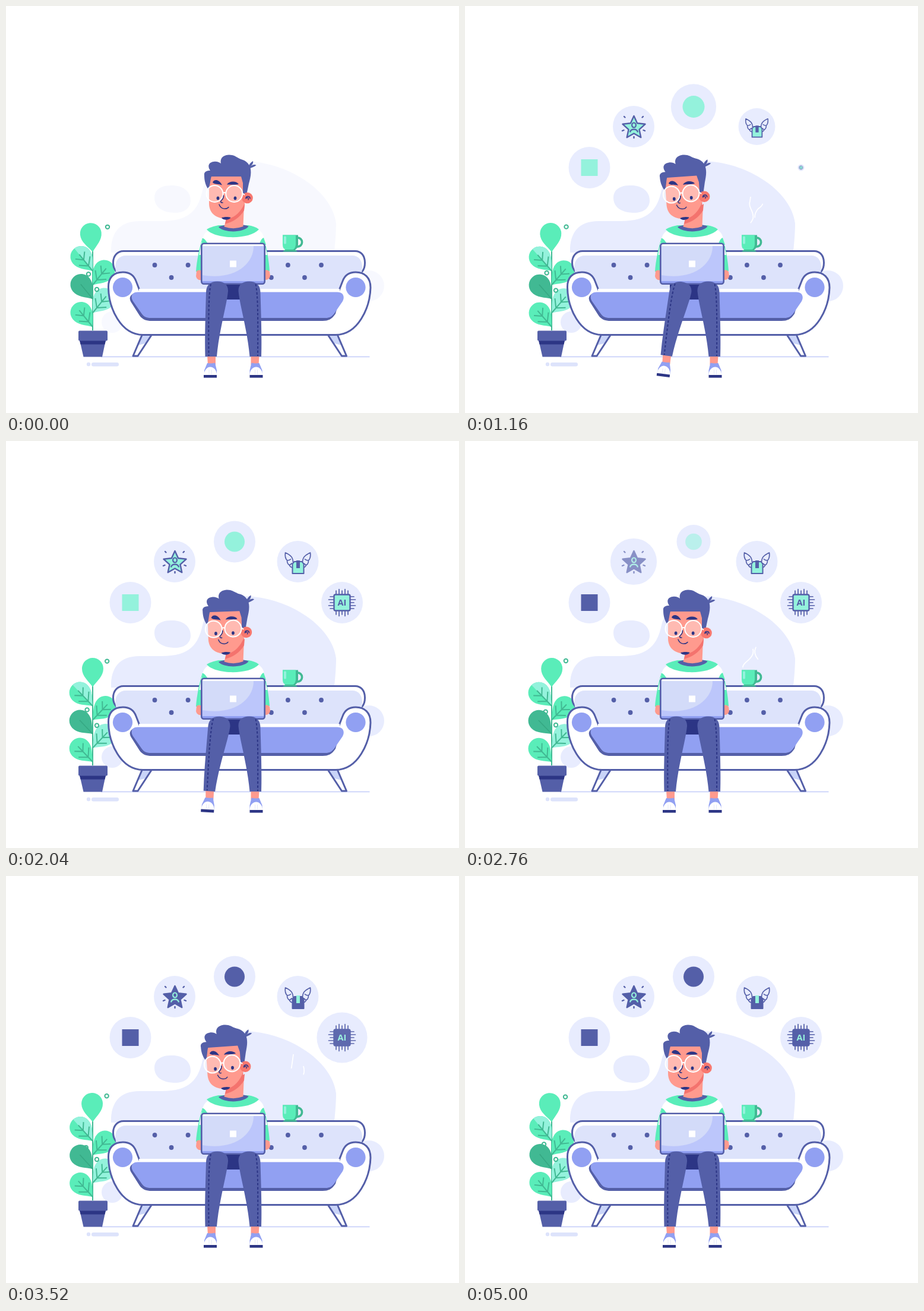
Write an HTML page that moves like this. It is 763 px wide and 685 px high and loops after 5.04 s.

```html
<!DOCTYPE html>
<html lang="en">
<head>
<meta charset="utf-8">
<title>Working from the sofa</title>
<style>
html, body { margin: 0; width: 100%; height: 100%; overflow: hidden; background: #fff; }
svg { display: block; width: 100vw; height: 100vh; }
.ink { fill: #545fa8; }
.line { fill: none; stroke: #545fa8; stroke-width: 3; stroke-linecap: round; stroke-linejoin: round; }
.navy { fill: #2c3585; }
.peri { fill: #91a0f2; }
.pale { fill: #dde3fb; }
.skin { fill: #ff9a8e; }
.green { fill: #5aedb9; }
.deep { fill: #41b993; }
.mint { fill: #94f2dc; }
.white { fill: #fff; }
.vein { fill: none; stroke: #41b993; stroke-width: 2; }
.steam { fill: none; stroke: #fff; stroke-width: 1.7; }
.thin { fill: none; stroke: #2c3585; stroke-width: 1.5; stroke-linecap: round; }
.out { stroke: #545fa8; stroke-width: 2.4; stroke-linejoin: round; stroke-linecap: round; }
.fine { fill: none; stroke: #545fa8; stroke-width: 1.7; stroke-linejoin: round; stroke-linecap: round; }
.ai { font: 700 14.5px "Open Sans", sans-serif; text-anchor: middle; }
</style>
</head>
<body>
<svg viewBox="0 0 763 685" preserveAspectRatio="none">
  <defs>
    <path id="leaf" d="M0 0C-7-10-18-18-18-31A18 18 0 0 1 18-31C18-18 7-10 0 0Z"/>
    <path id="half" d="M0 0V-49A18 18 0 0 1 18-31C18-18 7-10 0 0Z"/>
    <path id="veins" class="vein" d="M0 0V-36M-12-22L0-11L12-22M-10-34L0-24L10-34"/>
    <g id="sofaLeg">
      <path d="M229 554L214 589H222L245 554Z" fill="#fff"/>
      <path d="M228 555H244L234 568L222 571Z" fill="#c9d4f8"/>
      <path class="line" d="M229 554L214 589H222L245 554"/>
    </g>
    <g id="leg">
      <path class="skin" d="M339 588H353V604H340Z"/>
      <path class="peri" d="M339 601Q346 602 352 600.5L355 613V621H334V613Z"/>
      <path class="white" d="M333.5 621C334 612 339 607.5 344 607.5C350 607.5 355 613 355 621Z"/>
      <path d="M342 612V620M346 612V620" stroke="#e4e8fa" fill="none"/>
      <rect class="navy" x="333" y="621" width="22" height="4.6"/>
      <path class="ink" d="M337 482C337 469 345 463.5 356 463.5C367 463.5 374.5 469 374 480C372 503 359 545 355 590H335.5C334.5 555 336 520 337 482Z"/>
      <path d="M345 468C341 485 341 530 341.5 589" fill="none" stroke="#2c3585" stroke-width="2" stroke-dasharray="4 3"/>
    </g>
    <path id="wing" class="fine" d="M-8 1C-8-7-12-11-21-15C-22-8-20-4-18-2C-18 3-16 5-14 6C-13 9-11 10-8 10M-18-2Q-14-2-12-4M-14 6L-10 3"/>
  </defs>

  <g id="backdrop" fill="#e8ecfe">
    <path d="M177 415C176 383 190 362 225 362H262C310 362 324 342 331 310C339 276 375 257 417 262C485 269 550 315 556 366C556 385 554 400 553 415Z"/>
    <path d="M250 323C250 308 263 301 280 302C298 302 311 312 311 327C311 342 298 349 282 348C264 347 250 339 250 323Z"/>
    <circle cx="611" cy="471" r="26"/><circle cx="179" cy="532" r="18"/>
  </g>

  <path d="M160 590.3H612.5" stroke="#c9d2fa" stroke-width="1.7"/>
  <circle class="pale" cx="139" cy="603" r="3.2"/>
  <rect class="pale" x="144" y="600" width="46" height="6.4" rx="3.2"/>

  <path class="vein" d="M146 411V546"/>
  <g id="plant"></g>
  <path class="ink" d="M124 562H168L162 590.5H130.5Z"/>
  <path class="navy" d="M124 563H168L166.5 569.5H125.5Z"/>
  <rect class="ink" x="122" y="546.5" width="49" height="17" rx="2"/>

  <use href="#sofaLeg"/><use href="#sofaLeg" transform="matrix(-1 0 0 1 787.5 0)"/>
  <path class="line" style="fill:#fff" d="M198 412.5H588C598 412.5 604.5 420 604.5 432C604.5 445 598 452 588 452H198C188 452 180.5 444 180.5 432C180.5 420 188 412.5 198 412.5Z"/>
  <path class="pale" d="M202 420H583C594 420 600 428 600 440L596 478H190L184 440C184 428 191 420 202 420Z"/>
  <g id="buttons" class="ink"></g>
  <path class="line" style="fill:#fff" d="M226 481L219 463C215 452 207 448 197 448C181 448 172 457 172.5 474C173 508 193 553.5 231 553.5H555C593 553.5 613 508 614 474C614 457 604 448 589 448C579 448 571 452 567 463L560 481"/>
  <path class="white" d="M224 476H562V486H224Z"/>
  <path class="ink" d="M222 482C209 484 206 491 211 499L225 521C230 528 237 530 245 530H533C543 530 549 527 555 518L560 500Z"/>
  <path class="peri" d="M222 481.5H558C568 481.5 571 489 567 497L554 516C549 523 545 525 538 525H244C236 525 232 523 228 517L214 497C209 489 212 481.5 222 481.5Z"/>
  <circle class="peri" cx="196.5" cy="473.5" r="16.6"/><circle class="peri" cx="589" cy="473.5" r="16.6"/>

  <g id="steam"></g>
  <circle cx="491" cy="397.5" r="7.6" fill="none" stroke="#41b993" stroke-width="3.6"/>
  <path class="deep" d="M466 385.5H492V402Q491 411 482 411H474Z"/>
  <path class="green" d="M466 385.5H488V402Q487 411 479 411H474Q466 410 466 402Z"/>
  <rect class="mint" x="468" y="387.5" width="4" height="13" rx="1.5"/>
  <path class="deep" d="M470 410H487L491 413.5H466Z"/>

  <g id="body">
    <path class="green" d="M331 390C326 405 321 430 320 447L331 449V392ZM434 390C439 405 443 430 444 446L434 449Z"/>
    <path class="white" d="M329 398L325.5 419H331V398ZM435 398L440 419H434V398Z"/>
    <path class="skin" d="M321 446Q325 443 331 446V461Q322 463 320 455ZM434 446Q440 442 444 447L445 454Q444 462 434 461Z"/>
    <path class="white" d="M357 371C343 374 333 381 331 392L328 404H438L434 388C432 379 421 372 409 370Z"/>
    <path class="green" d="M331 391Q334 390 340 400L329 402ZM434 390Q430 391 427 400L438 402Z"/>
    <path class="green" d="M358 369C349 371 342 373 338 376C352 393 410 394 426 376C421 372 415 370 408 369Z"/>
    <path class="ink" d="M358 372C364 367 402 366 408.5 371C400 382 367 382 358 372Z"/>
    <path class="skin" d="M372 345L401 334L399.5 371Q384 377 367.5 371.5L371 358Z"/>
    <path d="M402 333L401 344C394 356 383 363 369 367L371 356Z" fill="#f4736e"/>
  </g>

  <g id="head">
    <path class="skin" d="M344 284H399L402 318V334C395 348 385 358 372 358C355 358 342 350 342 332V308Z"/>
    <path d="M402 332C396 346 386 355 375 358L371 361C386 358 397 351 401 343Z" fill="#f4736e"/>
    <path class="ink" d="M334 285C333 279 338 277 344 277C339 270 341 263 350 262C355 261 359 263 362 265C360 257 365 251 375 250.5C385 250 390 256 396 258C404 260 409 265 411.5 272C414 282 411 291 409 299L405 318H399V298L396 287H346C344 293 344 300 341 309C335 300 334 292 334 285Z"/>
    <path class="ink" d="M407 273C409 267 412 263 416 261C417 265 414 268 412 270C415 267 419 266 421.5 268C418 271 413 272 407 275Z"/>
    <circle cx="406.5" cy="323" r="9.3" fill="#f8786f"/>
    <path class="thin" d="M404 323C405 319 411 320 411 324M404 324C407 321 409 323 408 326"/>
    <path class="navy" d="M348 297C350 291 359 291 364 301.5C358 299 352 301 348 297ZM372 300.5C376 294 388 294 392 300C386 301.5 378 300 372 300.5Z"/>
    <g fill="#fff" fill-opacity=".32" stroke="#fff" stroke-width="2">
      <circle cx="351.5" cy="316" r="14"/><circle cx="384.3" cy="316" r="14"/>
      <path d="M365.5 315Q368 313 370.5 315M398 315L402 318" fill="none"/>
    </g>
    <g id="eyes" class="navy"><ellipse cx="357" cy="323.5" rx="2.4" ry="3"/><ellipse cx="386" cy="323.5" rx="2.4" ry="3"/></g>
    <path class="thin" d="M366.5 319C367 325 363 326 361.5 329Q362 331.5 365 331M359 334C362 343 372 342.500 375 338.500"/>
    <path class="navy" d="M363 356.5C367 354.5 374 354.5 378.5 356C376 361 366 361 363 356.5Z"/>
  </g>

  <rect class="navy" x="345" y="466" width="77" height="28"/>
  <rect x="329.5" y="400" width="106" height="67.5" rx="4" fill="#bcc6fb"/>
  <path d="M331 403H417C418 434 385 462 331 453Z" fill="#d3dbf9"/>
  <path class="white" d="M332 401H433L434 404H331Z"/>
  <path class="peri" d="M330 463H435V467H330Z"/>
  <rect class="line" style="stroke-width:2.6" x="329.3" y="399.8" width="106.4" height="68" rx="4"/>
  <rect class="white" x="377" y="428.5" width="11" height="11"/>
  <use href="#leg" transform="matrix(-1 0 0 1 765.5 0)"/>
  <use href="#leg" id="swing"/>

  <g id="bubbles"></g>
</svg>
<script>
const LOOP = 5040, STEP = 40, TAU = 2 * Math.PI;
const NS = "http://www.w3.org/2000/svg";
const $ = id => document.getElementById(id);

function add(parent, markup) {
  const g = document.createElementNS(NS, "g");
  g.innerHTML = markup;
  return parent.appendChild(g);
}
const clamp = x => Math.max(0, Math.min(1, x));
function ramp(t, from, to) {
  const x = clamp((t - from) / (to - from));
  return x * x * (3 - 2 * x);
}
const move = (el, transform) => el.setAttribute("transform", transform);
const show = (el, on) => el.setAttribute("visibility", on ? "visible" : "hidden");

// leaves alternate left and right up the stem, with one on top
const leaves = ["green", "mint", "deep", "green", "green"].map((fill, i) => {
  const side = i % 2 ? 1 : -1;
  const el = add($("plant"), `<use href="#leaf" class="${fill}"/>
    ${i === 4 ? '<use href="#half" class="mint"/>' : ""}<use href="#veins"/>
    ${fill === "deep" ? '<path d="M0 0V-32" stroke="#36a883" stroke-width="1.6"/>' : ""}`);
  return { el, y: 540 - 23.5 * i, rest: 39 * side, sway: 5 * side };
});
leaves.push({ el: add($("plant"), `<use href="#leaf" class="green"/>`), y: 414, rest: -6, sway: 6.5 });

// floating rings: place, sideways drift, bob height and phase
const rings = [[171, 371, 2, 1, 1], [139, 453, 6, 4, -2.7], [153, 477.7, 0, 1.2, -.6]].map(
  ([x, y, drift, bob, phase]) => ({ x, y, drift, bob, phase, el: add($("plant"), `<circle r="3.2" class="vein"/>`) }));

for (let i = 0; i < 11; i++)
  add($("buttons"), `<circle cx="${250.5 + 28.05 * i}" cy="${i % 2 ? 457 : 436}" r="3.9"/>`);

const wisps = [
  "M468 384C466 372 480 372 485 358C488 345 476 340 480 328C482 315 483 308 484 300",
  "M495 369C486 360 486 350 494 341C504 335 503 328 501 320"
].map(d => add($("steam"), `<path class="steam" pathLength="1" d="${d}"/>`).firstChild);

// icons, drawn around 0,0 in a bubble of radius 35
function starPath(R, r) {
  let d = "";
  for (let i = 0; i < 10; i++) {
    const a = i * Math.PI / 5, k = i % 2 ? r : R;
    d += `${i ? "L" : "M"}${(.5 + k * Math.sin(a)).toFixed(1)} ${(2 - k * Math.cos(a)).toFixed(1)}`;
  }
  return d + "Z";
}
const rays = `<path class="out" d="M-16-17L-14.5-15.5M16-17L14.5-15.5M-19 7L-16.5 6M19 7L16.5 6M.5 17V19" fill="none"/>`;
const star = (fill, pen) => `${rays}<path class="out ${fill}" d="${starPath(20, 9.5)}"/>
  <g fill="none" stroke="${pen}" stroke-width="2.2"><ellipse cx=".5" cy="-2.5" rx="3.4" ry="4"/><path d="M-6 9.5C-5 3 6 3 7 9.5"/></g>`;
const parcel = (fill, bow) => `<use href="#wing"/><use href="#wing" transform="scale(-1 1)"/>
  <path class="out ${fill}" style="stroke-width:2" d="M-9 4L-6 0H7L10 4V20H-9Z"/><path class="${bow}" d="M-2.5-2H3.5V11H-2.5Z"/>`;
function chip(fill, ink) {
  let pins = "";
  for (let i = -2; i <= 2; i++) {
    const p = i * 5, e = i % 2 ? 22.5 : 20;
    pins += `M${p} ${-e}V${e}M${-e} ${p}H${e}`;
  }
  return `<path class="fine" d="${pins}"/>
    <rect class="out ${fill}" x="-13.5" y="-13.5" width="27" height="27" rx="2.5"/><text class="ai ${ink}" y="5.3">AI</text>`;
}
const square = fill => `<rect class="${fill}" x="-14" y="-14" width="28" height="28"/>`;
const dot = fill => `<circle class="${fill}" r="17"/>`;

const bubbles = [
  [209.5, 272, square("mint"), square("ink")],
  [284, 203, star("mint", "#545fa8"), star("ink", "#94f2dc")],
  [385, 169.5, dot("mint"), dot("ink")],
  [491.5, 203, parcel("mint", "ink"), parcel("ink", "mint")],
  [566, 272, chip("mint", "ink"), chip("ink", "mint")]
].map(([x, y, first, second], i) => {
  const el = add($("bubbles"), `<circle fill="#e8ecfe"/>`);
  move(el, `translate(${x} ${y})`);
  return { el, disc: el.firstChild, first: add(el, first), second: add(el, second), pop: 360 + 177 * i, flip: 2150 + 230 * i };
});

const popSize = p => 39 * ramp(p, 0, 380) - 4 * ramp(p, 380, 600);
const flipSize = p => 15 * ramp(p, 180, 480) - 7 * ramp(p, 0, 180) - 8 * ramp(p, 480, 610);
const nod = p => ramp(p, 0, 400) - ramp(p, 1040, 1540);

function draw(t) {
  const turn = TAU * t / LOOP;
  $("backdrop").setAttribute("opacity", .32 + .68 * clamp(t / 680));

  const sway = (1 - Math.cos(turn)) / 2;
  for (const l of leaves) move(l.el, `translate(146 ${l.y}) rotate(${l.rest + l.sway * sway})`);
  for (const r of rings)
    move(r.el, `translate(${r.x - r.drift * t / LOOP} ${r.y + r.bob * Math.sin(turn + r.phase)})`);

  move($("head"), `rotate(${-4 * (nod(t - 740) + nod(t - 2960))} 372 370)`);
  move($("eyes"), `translate(${-2 * Math.sin(Math.PI * clamp(t / 4400)) - 3 * ramp(t, 4560, 5000)} 0)`);
  move($("swing"), `rotate(${7 * (ramp(t, 180, 860) - ramp(t, 1800, 2260))} 355 540)`);

  // two puffs; the tail of each wisp follows its head more slowly
  const puff = (t - (t < 2420 ? 570 : 2420)) / 770;
  const head = clamp(puff), tail = clamp((puff - .4) / 1.4);
  for (const w of wisps) {
    show(w, head > tail);
    w.setAttribute("stroke-dasharray", `0 ${tail} ${head - tail} 2`);
  }

  for (const b of bubbles) {
    const p = t - b.flip, r = popSize(t - b.pop) + flipSize(p);
    show(b.el, r > 0);
    b.disc.setAttribute("r", r);
    move(b.first, `scale(${r / 35})`);
    b.first.setAttribute("opacity", 1 - ramp(p, 20, 300));
    b.second.setAttribute("opacity", ramp(p, 200, 500));
  }
}

function tick() {
  draw(Math.floor(performance.now() % LOOP / STEP) * STEP);
  requestAnimationFrame(tick);
}
tick();
</script>
</body>
</html>
```
